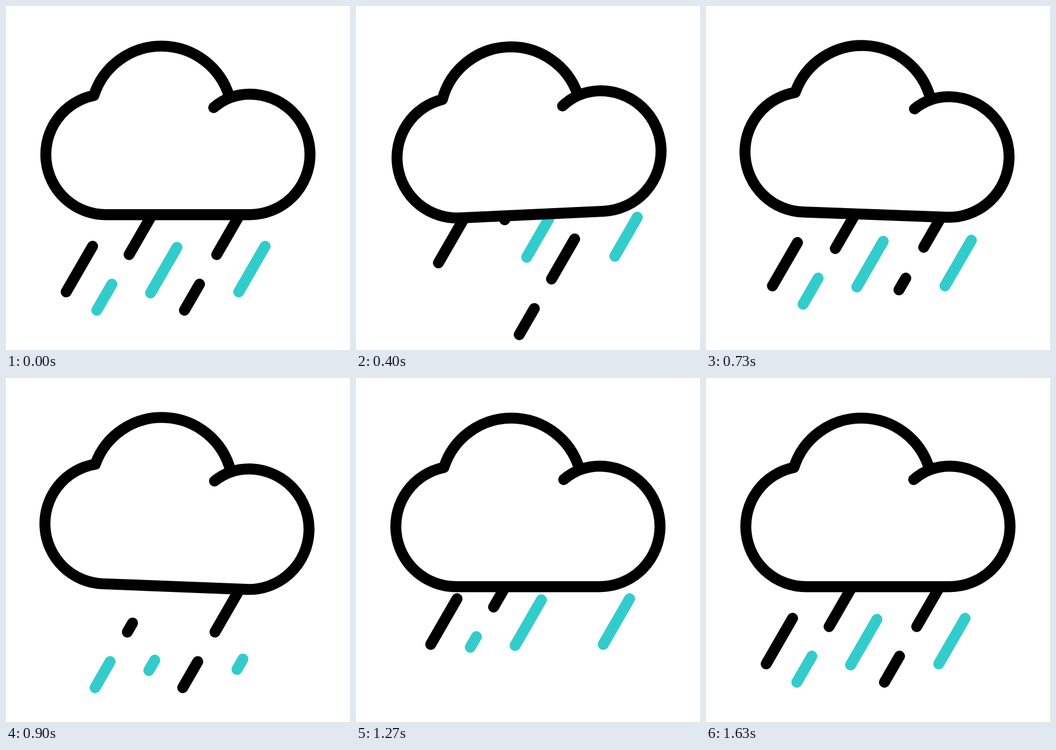
An HTML page that plays this animation: 640x640 px, repeating every 1670 ms.

```html
<!DOCTYPE html>
<html lang="en">
<head>
<meta charset="utf-8">
<title>Rain cloud</title>
<style>
  html, body { margin: 0; width: 100%; height: 100%; overflow: hidden; background: #fff; }
  svg { display: block; width: 100%; height: 100%; }
  path, line { stroke-linecap: round; stroke-linejoin: round; stroke-width: 20.4; }
</style>
</head>
<body>
<svg viewBox="0 0 640 640">
  <g id="rain"></g>
  <path id="cloud" fill="#fff" stroke="#000"
    d="M415.5 169A131.8 131.8 0 0 0 163.5 166.5A112 112 0 0 0 186.4 388.2H453.5
       A112.1 112.1 0 0 0 453.5 164A102.5 102.5 0 0 0 386.4 189"/>
</svg>
<script>
// All times are in animation steps, 30 per second.
const LOOP = 1670, STEP = 100 / 3, LAST = 49;
const TRIM = 4;            // time a drop takes to grow or vanish
const GROW_STRETCH = 1.15; // drops appear a little more spread out than they vanish
const LONG = 98, MEDIUM = 86, SHORT = 56;
const BLACK = '#000', TEAL = '#3cc';

const clamp = u => Math.min(1, Math.max(0, u));
const progress = (k, from, to) => clamp((k - from) / (to - from));
const mix = (a, b, u) => a + (b - a) * u;
const linear = u => u;
const smooth = u => u * u * (3 - 2 * u);
const easeOut = power => u => 1 - (1 - u) ** power;

// A shower drifts from high to low; the loop cuts one in two at its rest point.
const HIGH = { x: 58, y: -78 }, REST = { x: 0, y: 0 }, LOW = { x: -33, y: 53 };
const showers = [
  { from: REST, to: LOW, start: 0, end: 14, ease: linear, grow: -20, vanish: 1.8 },
  { from: HIGH, to: LOW, start: 6.4, end: 37, ease: linear, grow: 6.4, vanish: 22 },
  { from: HIGH, to: REST, start: 30, end: LAST, ease: easeOut(1.4), grow: 30.4, vanish: 60 }
];

const drops = [
  { color: BLACK, x: 161, y: 447, length: LONG, delay: -0.2 },
  { color: BLACK, x: 272, y: 388, length: MEDIUM, delay: 1.9 },
  { color: TEAL, x: 318, y: 449, length: LONG, delay: 1.9 },
  { color: TEAL, x: 482, y: 447, length: LONG, delay: 1.9 },
  { color: TEAL, x: 197, y: 517.5, length: SHORT, delay: 5.2 },
  { color: BLACK, x: 435, y: 388, length: MEDIUM, delay: 10.2 },
  { color: BLACK, x: 360, y: 517.5, length: SHORT, delay: 12 }
];

const rain = document.getElementById('rain');
const cloud = document.getElementById('cloud');

const streaks = showers.flatMap(shower => drops.map(drop => {
  const line = document.createElementNS('http://www.w3.org/2000/svg', 'line');
  line.setAttribute('stroke', drop.color);
  rain.append(line);
  return { line, shower, drop };
}));

function drawStreak({ line, shower, drop }, k) {
  const grow = shower.grow + drop.delay * GROW_STRETCH;
  const vanish = shower.vanish + drop.delay;
  const head = progress(k, grow, grow + TRIM);
  const tail = progress(k, vanish, vanish + TRIM);
  line.setAttribute('visibility', head > tail ? 'visible' : 'hidden');

  const u = shower.ease(progress(k, shower.start, shower.end));
  const x = drop.x + mix(shower.from.x, shower.to.x, u);
  const y = drop.y + mix(shower.from.y, shower.to.y, u);
  [tail, head].forEach((part, i) => {
    line.setAttribute(`x${i + 1}`, x - drop.length * part * Math.sin(Math.PI / 6));
    line.setAttribute(`y${i + 1}`, y + drop.length * part * Math.cos(Math.PI / 6));
  });
}

// The cloud rocks left, then right, then settles.
function tilt(k) {
  const left = easeOut(1.35)(progress(k, 0, 15));
  const right = smooth(progress(k, 15, 24.3));
  const settle = smooth(progress(k, 24.3, 32.5));
  return 3 * (2 * right - left - settle);
}

function tick() {
  const time = performance.now() % LOOP;
  const k = Math.min(LAST, Math.floor((time + 4) / STEP));
  cloud.setAttribute('transform', `rotate(${tilt(k)} 320 231)`);
  for (const streak of streaks) drawStreak(streak, k);
  requestAnimationFrame(tick);
}
tick();
</script>
</body>
</html>
```
